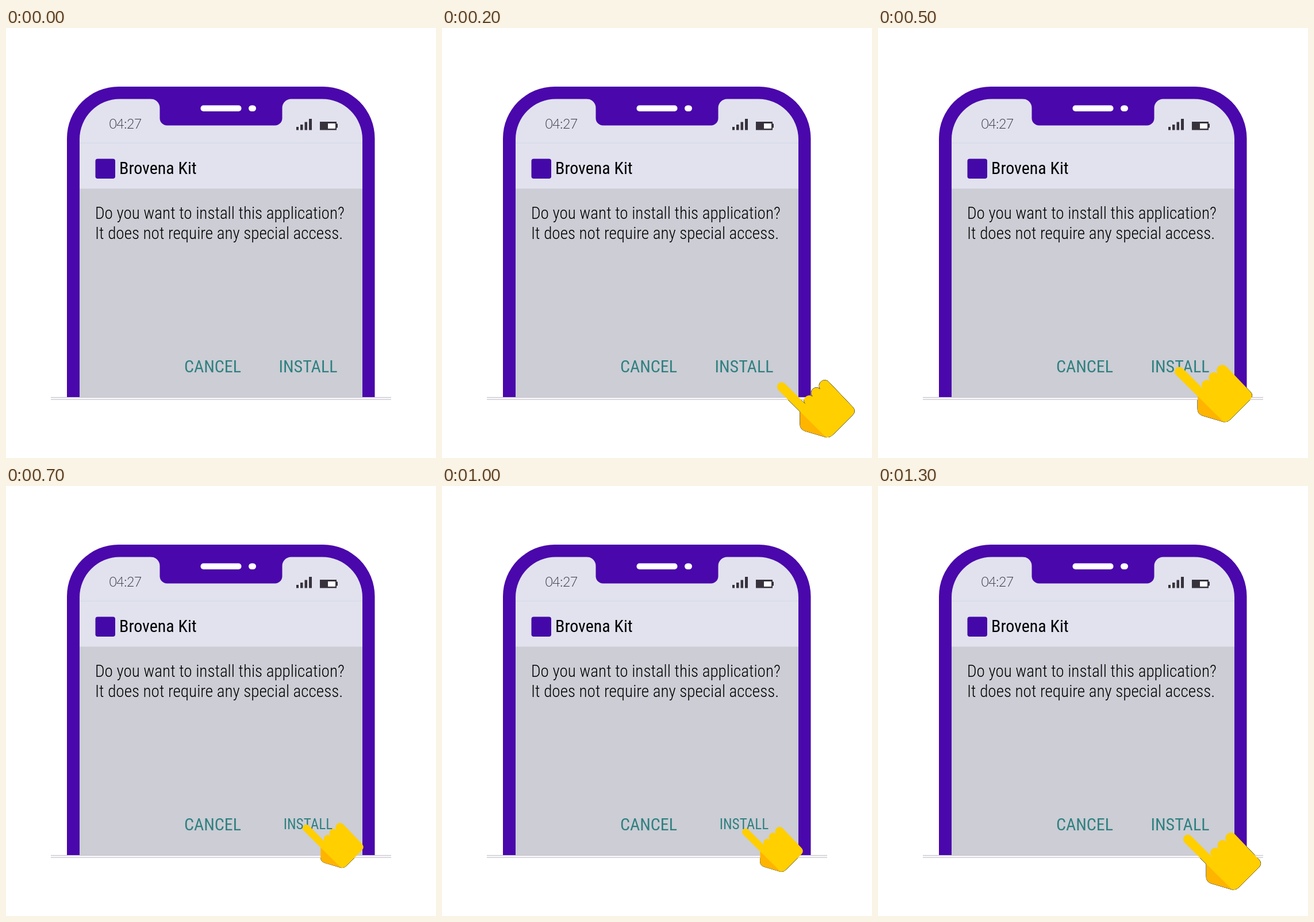
Write an HTML page that moves like this. It is 748x748 px and loops after 1500 ms.

```html
<!DOCTYPE html>
<html lang="en">
<head>
<meta charset="utf-8">
<title>Install prompt</title>
<style>
  html, body { margin: 0; width: 100%; height: 100%; overflow: hidden; background: #fff; }
  svg { display: block; width: 100%; height: 100%; }
  text { font-family: "Roboto Condensed", Roboto, sans-serif; font-stretch: 75%; }
  .name { font-size: 30px; }
  .body { font-size: 29.15px; font-weight: 300; }
  .button { font-size: 30px; fill: #2f8080; text-anchor: middle; }
  .clock { font: 300 23px Lato, sans-serif; letter-spacing: -.6px; fill: #3c3a42; }
</style>
</head>
<body>
<svg viewBox="0 0 748 748">
  <defs>
    <path id="hand" d="M2.3 16.7A8 8 0 0 1 13.7 5.3L50 41.6A9 9 0 0 1 62 28A9 9 0 0 1 75 15A9.5 9.5 0 0 1 91 3.500L131.500 46Q138 53 131.500 60L97 94.500Q92 99.500 85 98.500L48 87.500Q40 84.500 40 76V54Z"/>
    <clipPath id="outside">
      <path clip-rule="evenodd" d="M0 0H748V748H0ZM106 642V102H641V642H670V647H78V642Z"/>
    </clipPath>
  </defs>

  <path d="M106 642V192A90 90 0 0 1 196 102H551.500A90 90 0 0 1 641.500 192V642Z" fill="#4a07ab"/>
  <path d="M128 642V193.500A70 70 0 0 1 198 123.500H252A15.500 15.500 0 0 1 267.500 139V157A12.500 12.500 0 0 0 280 169.500H468A12.500 12.500 0 0 0 480.500 157V139A15.500 15.500 0 0 1 496 123.500H550A70 70 0 0 1 620 193.500V642Z" fill="#e1e2ee"/>
  <path d="M128 279.500H620V642H128Z" fill="#cccdd5"/>
  <path d="M128 200H620" stroke="#d3d8e6"/>

  <g fill="#fff">
    <rect x="338.500" y="134.500" width="71" height="10.500" rx="5"/>
    <rect x="422" y="134.500" width="13" height="10.500" rx="5.200"/>
  </g>
  <text class="clock" x="179.500" y="175">04:27</text>
  <path d="M505 172h4v5.500h-4zM512 168h4.500v9.500H512zM519.500 163.500h4.500v14h-4.500zM527 158h5v19.500h-5zM546 163h29v3.500h2v7h-2v4h-29z" fill="#37323c"/>
  <path d="M560 166h13v9h-13z" fill="#fff"/>

  <rect x="155.500" y="227.500" width="34.500" height="34.500" rx="4" fill="#4408a8"/>
  <text class="name" x="197" y="253.500">Brovena Kit</text>
  <text class="body" x="155" y="331.500">Do you want to install this application?</text>
  <text class="body" x="155" y="366.500">It does not require any special access.</text>
  <text class="button" x="359.500" y="599">CANCEL</text>
  <g id="install"><text class="button" x="525.500" y="599">INSTALL</text></g>

  <rect x="78" y="642" width="592" height="5" fill="#fff"/>
  <path d="M78 642.700H670M78 646.200H670" stroke="#c6c1cd" stroke-width="1.200"/>

  <g clip-path="url(#outside)">
    <use class="mover" href="#hand" fill="#000" stroke="#000"/>
  </g>
  <g class="mover" id="skin">
    <use href="#hand" fill="#ffcf00"/>
    <path d="M40 54L85 98.500L48 87.500Q40 84.500 40 76Z" fill="#ffb400"/>
  </g>
</svg>
<script>
  const LOOP = 1500, STEP = 100;
  const movers = document.querySelectorAll(".mover");
  const skin = document.getElementById("skin");
  const install = document.getElementById("install");

  const ease = (n, start, end, power) =>
    Math.min(Math.max((n - start) / (end - start), 0), 1) ** power;

  function draw(time) {
    const n = Math.floor(time % LOOP / STEP);
    const enter = 1 - ease(n, 1, 5, 1.6);
    const leave = ease(n, 7, 13, 1.3);
    const pressed = n >= 7 && n < 12;
    const x = 516 + 75 * enter + 15 * leave;
    const y = 586.5 + 30 * enter + 17 * leave;

    for (const el of movers) {
      el.setAttribute("transform", `translate(${x} ${y}) scale(${pressed ? .785 : 1})`);
      el.setAttribute("visibility", n ? "visible" : "hidden");
    }
    skin.setAttribute("opacity", Math.min(n * .54, 1));
    install.setAttribute("transform",
      `translate(525.5 588) scale(${pressed ? .84 : 1}) translate(-525.5 -588)`);
  }

  function tick() {
    draw(performance.now());
    requestAnimationFrame(tick);
  }
  tick();
</script>
</body>
</html>
```
